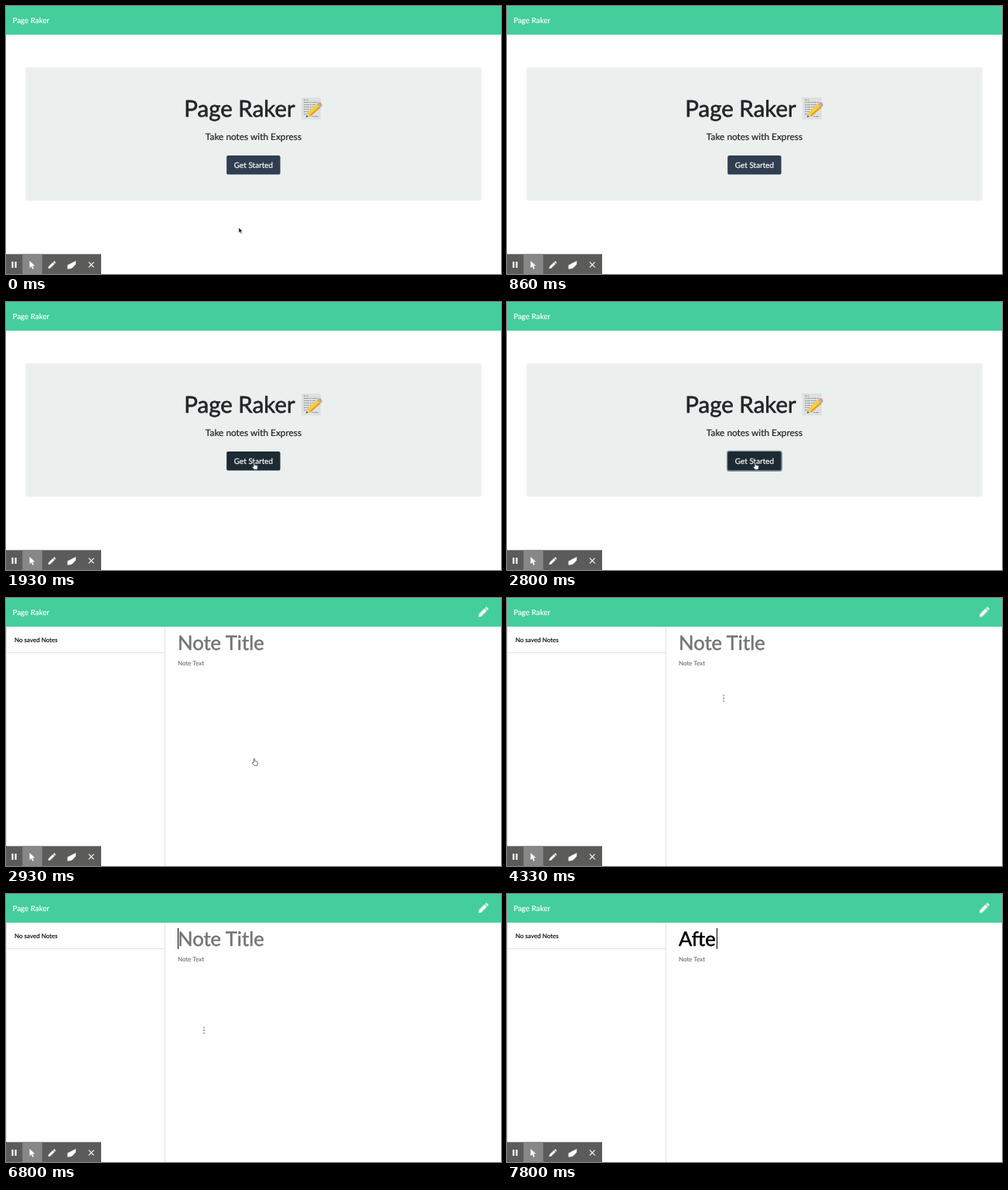
An HTML page that plays this animation: 640 by 346 pixels, repeating every 8000 ms.

```html
<!DOCTYPE html>
<html lang="en">
<head>
<meta charset="utf-8">
<title>Notes</title>
<style>
html, body { margin: 0; width: 100%; height: 100%; overflow: hidden; background: #fdfefd; }
svg { display: block; width: 100%; height: 100%; }
/* A hairline stroke gives the heavier strokes of smoothed screen type */
text {
  font-family: Lato, sans-serif; text-rendering: geometricPrecision; white-space: pre;
  fill: currentColor; stroke: currentColor; stroke-width: .02em;
}
.mid { text-anchor: middle; }
.big { font-size: 25.6px; }
.small { font-size: 8px; }
.dark { color: #212529; }
.light { color: #fff; }
.hint { color: #747474; }

/* Every part shares one 8 s clock */
.t { animation: 8s step-end infinite; }
.home { animation-name: home; }
.editor { animation-name: editor; }
.button { animation-name: hover; animation-timing-function: linear; }
.ring { animation-name: ring; animation-timing-function: linear; }
.pointer { animation-name: move; animation-timing-function: linear; }
.arrow { animation-name: arrow; }
.hand { animation-name: hand; }
.ibeam { animation-name: ibeam; }
.empty { animation-name: empty; }
.caret { animation-name: blink, advance; }
.typed1 { animation-name: typed1; }
.typed2 { animation-name: typed2; }
.typed3 { animation-name: typed3; }

@keyframes home { 0% { opacity: 1 } 36.625%, 100% { opacity: 0 } }
@keyframes editor { 0% { opacity: 0 } 36.625%, 100% { opacity: 1 } }
@keyframes hover { 0%, 21.25% { fill: #2f3e50 } 23%, 100% { fill: #1c2a34 } }
@keyframes ring { 0%, 27.5% { opacity: 0 } 29.4%, 100% { opacity: 1 } }
@keyframes move {
  0%, .75% { transform: translate(301px, 286px) }
  8.25% { transform: translate(304px, 279px) }
  14.125% { transform: translate(304px, 279px); animation-timing-function: ease-in-out }
  24.125%, 51.6% { transform: translate(321px, 207px) }
  51.625% { transform: translate(317px, 199px); animation-timing-function: ease-in-out }
  56.625%, 60% { transform: translate(244px, 61px) }
  65.75% { transform: translate(244.5px, 118px) }
  70%, 100% { transform: translate(256px, 176px) }
}
@keyframes arrow {
  0% { opacity: 1 } 8.25% { opacity: 0 }
  14.125% { opacity: 1 } 21.25%, 100% { opacity: 0 }
}
@keyframes hand { 0% { opacity: 0 } 21.25% { opacity: 1 } 47.5%, 100% { opacity: 0 } }
@keyframes ibeam { 0% { opacity: 0 } 51.625% { opacity: 1 } 95%, 100% { opacity: 0 } }
@keyframes empty { 0% { opacity: 1 } 91.625%, 100% { opacity: 0 } }
@keyframes blink {
  0% { opacity: 0 } 60% { opacity: 1 } 66.625% { opacity: 0 }
  72.5% { opacity: 1 } 78.25% { opacity: 0 } 85%, 100% { opacity: 1 }
}
@keyframes advance {
  0% { transform: none } 91.625% { transform: translateX(17.5px) }
  95% { transform: translateX(35.5px) } 97.5%, 100% { transform: translateX(49px) }
}
@keyframes typed1 { 0% { opacity: 0 } 91.625% { opacity: 1 } 95%, 100% { opacity: 0 } }
@keyframes typed2 { 0% { opacity: 0 } 95% { opacity: 1 } 97.5%, 100% { opacity: 0 } }
@keyframes typed3 { 0% { opacity: 0 } 97.5%, 100% { opacity: 1 } }
</style>
</head>
<body>
<svg viewBox="0 0 640 346">
  <defs>
    <path id="pencil" d="M0 14l.8-4L8.6 2.2l3.2 3.2L4 13.2zM9.4 1.4L10.4.4Q11 0 11.6.4L13.6 2.4Q14 3 13.6 3.6L12.6 4.6z"/>
  </defs>
  <rect width="640" height="346" fill="#fdfefd"/>

  <g class="t home">
    <rect x="25.3" y="79.5" width="589.4" height="171.7" rx="2" fill="#ebefee"/>
    <text class="mid dark" x="302" y="143" font-size="29.5">Page Raker</text>
    <g>
      <rect x="382" y="118" width="25" height="28.5" fill="#dfe1e0"/>
      <g fill="none" stroke="#7f8384" stroke-width=".8">
        <path d="M385 121.2h6" stroke-dasharray="3 .7"/>
        <path d="M385 124.4h18M385 127.4h18M385 130.4h14M385 133.4h11M385 136.4h6M385 139.4h4M396 142.6h8" stroke-dasharray="2.5 .6 4 .8"/>
      </g>
      <path d="M388 143.5l1.6-5.7 4.2 4.8z" fill="#e9c893"/>
      <path d="M388 143.5l.7-2.4 1.8 2z" fill="#333"/>
      <path d="M389.6 137.8L402.2 126.4l4.2 4.8L393.8 142.6z" fill="#f8cf3a"/>
      <path d="M392.4 141L405 129.6l1.4 1.6L393.8 142.6z" fill="#dda02a"/>
      <path d="M402.2 126.4l1.5-1.4 4.2 4.8-1.5 1.4z" fill="#a9b0b3"/>
      <path d="M403.7 125q2-1.6 4 .5 1.8 2.2.2 4.3z" fill="#e58f80"/>
    </g>
    <text class="mid dark" x="320" y="173.4" font-size="11.86">Take notes with Express</text>
    <rect class="t ring" x="284.7" y="192.5" width="70.6" height="25.8" rx="2.8" fill="none" stroke="#8e9ba4" stroke-width="1.6"/>
    <rect class="t button" x="285.2" y="193" width="69.4" height="24.6" rx="2.2" fill="#2f3e50"/>
    <text class="mid light" x="320" y="209" font-size="10">Get Started</text>
  </g>

  <g class="t editor">
    <path d="M.5 37V346M205.5 37V346M0 70.5H205" stroke="#e0e1e0" fill="none"/>
    <text class="small" x="11" y="56.8">No saved Notes</text>
    <text class="big hint t empty" x="222" y="66.6">Note Title</text>
    <text class="big t typed1" x="222" y="66.6">A</text>
    <text class="big t typed2" x="222" y="66.6">Aft</text>
    <text class="big t typed3" x="222" y="66.6">Afte</text>
    <rect class="t caret" x="222" y="44" width="1" height="27"/>
    <text class="small hint" x="222" y="87.4">Note Text</text>
  </g>

  <rect width="640" height="37" fill="#44ce9b"/>
  <text class="light" x="8.5" y="22.3" font-size="9.8">Page Raker</text>
  <g class="t editor">
    <use href="#pencil" transform="translate(610.8 11.5) scale(.93)" fill="#fff"/>
  </g>

  <g>
    <rect y="320.3" width="123" height="25.7" fill="#5b5b5a"/>
    <rect x="21.3" y="320.3" width="25.5" height="25.7" fill="#878787"/>
    <g fill="#fff">
      <path d="M7.4 330h2.1v8h-2.1zM11.5 330h2.1v8h-2.1z"/>
      <path d="M30.5 329v9.2l2.3-2 1.6 3.5 1.5-.7-1.6-3.4h3.1z"/>
      <use href="#pencil" transform="translate(54.5 329.2) scale(.71)"/>
      <path d="M79.5 334.4L90.2 329v4.4L85 338.7l-5.5 1z"/>
    </g>
    <path d="M107 330.7l6.6 6.6m0-6.6l-6.6 6.6" stroke="#fff" stroke-width="1.2"/>
  </g>

  <g class="t pointer">
    <path class="t arrow" d="M0 0v6.8l1.6-1.4 1.1 2.7 1.2-.5-1.1-2.6h2.1z" fill="#111" stroke="#fff" stroke-width=".5"/>
    <path class="t hand" d="M-.9.9Q0-.2.7.9V3.6L3.4 4.1Q4.7 4.4 4.6 5.7L3.9 9.3H-.3L-2.6 6.2Q-2.5 5-1.4 5.5L-.9 6z" fill="#fff" stroke="#333" stroke-width=".7" stroke-linejoin="round"/>
    <g class="t ibeam" stroke="#8c8c8c" fill="none">
      <path d="M-1.1-3.6H1.1M-1.1 0H1.1M-1.1 3.6H1.1" stroke-width="1.3"/>
      <path d="M0-3.6V3.6" stroke-width=".7" opacity=".3"/>
    </g>
  </g>
</svg>
</body>
</html>
```
